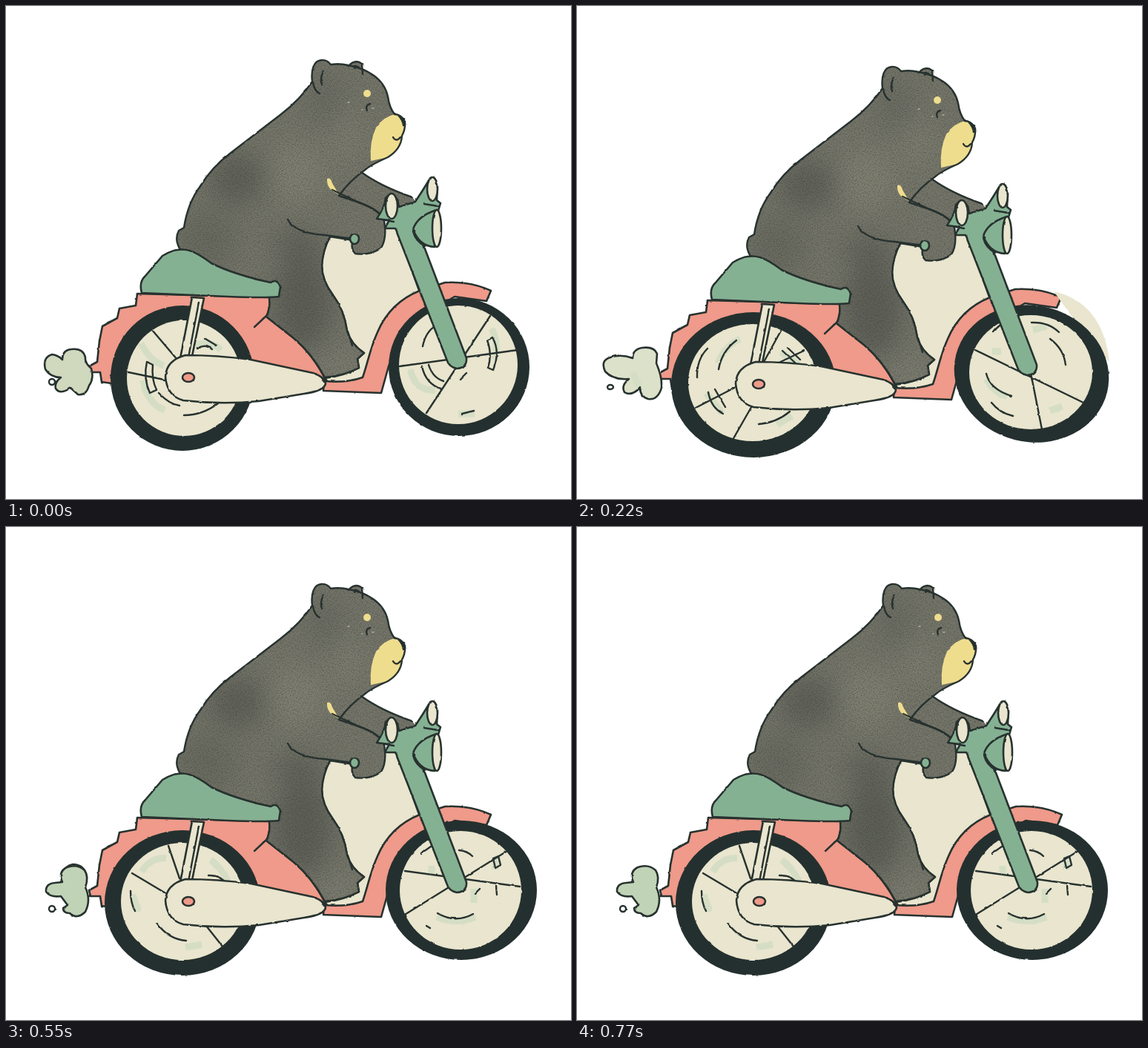
An HTML page that plays this animation: 762 by 665 pixels, repeating every 880 ms.

```html
<!DOCTYPE html>
<html lang="en">
<head>
<meta charset="utf-8">
<title>Bear on a scooter</title>
<style>
html, body { margin: 0; width: 100%; height: 100%; overflow: hidden; background: #fff; }
svg { display: block; width: 100vw; height: 100vh; }
.ride { animation: bounce 440ms step-end infinite; }
.high { animation: high 440ms step-end infinite; }
.mid { animation: mid 440ms step-end infinite; }
.low { animation: low 440ms step-end infinite; }
.rim { animation: rim 880ms step-end infinite; }
@keyframes bounce { 0% { transform: none; } 25%, 75% { transform: translate(0, 4px); } 50% { transform: translate(-1px, 9px); } }
@keyframes high { 0% { opacity: 1; } 25%, 100% { opacity: 0; } }
@keyframes mid { 0%, 50% { opacity: 0; } 25%, 75% { opacity: 1; } }
@keyframes low { 0%, 75%, 100% { opacity: 0; } 50% { opacity: 1; } }
@keyframes rim { 0% { opacity: 1; } 87.5%, 100% { opacity: 0; } }
path, ellipse, circle { stroke-linejoin: round; stroke-linecap: round; }
.ink { stroke: #27322f; stroke-width: 2.6; }
.line { fill: none; stroke: #27322f; stroke-width: 2.4; }
.coral { fill: #ef9a8a; }
.cream { fill: #e9e5ce; }
.green { fill: #85b193; }
.yellow { fill: #efdd8e; }
.black { fill: #24302f; }
.wash { fill: none; stroke: #d5dec5; stroke-width: 9; stroke-linecap: butt; }
.fur { fill: #77776b; }
</style>
</head>
<body>
<svg viewBox="0 0 762 665" preserveAspectRatio="none">
<defs>
  <filter id="rough" filterUnits="userSpaceOnUse" x="0" y="0" width="762" height="665" color-interpolation-filters="sRGB">
    <feTurbulence type="fractalNoise" baseFrequency=".09" numOctaves="3" seed="4"/>
    <feDisplacementMap in="SourceGraphic" scale="2" xChannelSelector="R" yChannelSelector="G"/>
  </filter>
  <filter id="grain" filterUnits="userSpaceOnUse" x="200" y="50" width="380" height="470" color-interpolation-filters="sRGB">
    <feTurbulence type="fractalNoise" baseFrequency=".6" numOctaves="2" seed="7"/>
    <feColorMatrix values="0 0 0 0 .16  0 0 0 0 .18  0 0 0 0 .17  .9 0 0 0 -.36"/>
    <feComposite in2="SourceGraphic" operator="in" result="specks"/>
    <feMerge><feMergeNode in="SourceGraphic"/><feMergeNode in="specks"/></feMerge>
  </filter>
  <filter id="soft" filterUnits="userSpaceOnUse" x="150" y="0" width="480" height="600" color-interpolation-filters="sRGB">
    <feGaussianBlur stdDeviation="16"/>
  </filter>
  <path id="bear" d="M413 102C411 86 415 74 425 73Q433 72 438 79Q450 77 462 80Q480 83 495 93Q511 104 515 122Q517 137 524 146Q533 146 538 156Q539 166 534 175Q533 193 515 204Q492 214 483 222Q463 236 449 256L476 265Q506 276 510 290Q514 313 506 326Q492 337 471 334Q464 327 468 316L437 311Q427 330 426 350Q426 370 441 390Q456 410 460 438Q465 456 483 468L474 476L476 488Q455 499 430 501Q414 470 388 448L351 419Q357 407 355 393L300 385L234 327Q227 314 233 303L240 299Q245 266 262 243Q278 217 302 199L371 146Q397 126 413 102Z"/>
  <clipPath id="inside"><use href="#bear"/></clipPath>
</defs>

<g class="ride" filter="url(#rough)">
  <path class="cream ink" d="M437 311Q427 330 426 350Q426 370 441 390Q456 410 460 438Q465 456 483 468L474 476L476 488Q455 499 430 502L434 507L482 507L510 440L558 386L527 300L505 296L490 311Z"/>
  <path class="coral ink" d="M177 388L175 404L153 408L150 421L130 432L126 452L123 480L112 486L114 494L127 494L129 507L142 509L340 500L432 506Q414 470 388 448L351 419Q357 407 355 393Z"/>
  <path class="line" d="M351 418L335 433"/>
  <path class="coral ink" d="M429 506Q458 509 481 501C488 481 491 462 501 440Q518 400 558 384L592 373Q626 371 654 384L648 398L605 392L575 410L530 450L516 486L506 522L428 519Z"/>
</g>

<g class="high" filter="url(#rough)">
  <path class="ink" fill="#d0d8bd" d="M53 490Q49 474 62 470Q70 471 76 477Q76 464 88 463Q104 461 107 474Q106 481 115 489Q119 503 112 512Q108 526 97 524L87 515Q73 525 67 516Q65 508 74 501Q60 501 53 490Z"/>
  <circle class="line" cx="62" cy="507" r="4"/>
  <ellipse class="black" cx="238" cy="502" rx="97" ry="98"/>
  <ellipse class="cream" cx="240" cy="502" rx="77" ry="78"/>
  <path class="wash" d="M182 455Q195 480 213 485M184 505Q191 536 214 545M251 459Q275 449 290 464"/>
  <path class="line" d="M197 437L231 477M165 494L218 505M190 480L198 484Q196 503 203 518L194 522Q185 502 190 480M206 522Q220 537 234 539M240 552Q265 552 286 536M258 462Q268 455 278 463M269 449L284 458"/>
  <ellipse class="black" cx="611" cy="487" rx="95" ry="93"/>
  <ellipse class="cream" cx="610" cy="484" rx="80" ry="80"/>
  <path class="wash" d="M545 490Q552 520 579 518M655 435Q665 455 659 477M610 550H632"/>
  <path class="line" d="M653 418L567 549M531 486L690 464M562 459Q566 439 580 431M561 486Q566 510 588 517M570 484Q575 501 590 506M656 447Q667 466 657 491L650 488Q656 470 649 451ZM615 550L631 546M613 503L621 495"/>
</g>

<g class="mid" filter="url(#rough)">
  <path class="ink rim" fill="#fff" d="M77 468Q79 457 90 455Q106 455 109 472Z"/>
  <path class="ink" fill="#c1d3b6" d="M54 492Q53 481 66 480L76 479Q70 465 82 459Q96 454 106 463Q112 472 107 486Q115 503 107 519Q96 530 86 521Q77 521 77 514L83 510L74 498Q60 500 54 492Z"/>
  <circle class="line" cx="62" cy="515" r="4"/>
  <ellipse class="black" cx="238" cy="507" rx="105" ry="98"/>
  <ellipse class="cream" cx="238" cy="505" rx="83" ry="79"/>
  <path class="wash" d="M183 465Q196 445 216 447M276 449Q291 460 299 478M171 496L178 519M242 567L264 563"/>
  <path class="line" d="M170 467L222 498M219 430L234 474M270 538L293 567M204 535Q219 556 243 558M168 491Q168 507 174 518M273 470Q289 469 298 482"/>
  <ellipse class="black" cx="614" cy="490" rx="102" ry="94"/>
  <ellipse class="cream" cx="613" cy="490" rx="82" ry="80"/>
  <path class="wash" d="M581 526Q606 537 633 526M631 488V507M660 445V462M574 457V469"/>
  <path class="line" d="M538 464L693 485M536 524L676 437M582 521Q606 535 630 522M560 440L573 431M611 436Q622 437 629 444M657 447L664 444L667 456L660 460ZM633 494L639 488M661 485L662 496M567 538L572 541"/>
</g>

<g class="low" filter="url(#rough)">
  <path class="ink" fill="#dce1ca" d="M38 493Q31 478 45 474Q59 469 75 475Q75 463 88 461Q104 459 108 469L107 482Q115 500 114 515Q109 532 96 530Q85 527 85 515Q73 527 64 521Q59 512 70 503Q49 505 38 493Z"/>
  <path class="wash" d="M75 494L84 514"/>
  <ellipse class="line" cx="45" cy="514" rx="4" ry="3"/>
  <ellipse class="black" cx="238" cy="511" rx="111" ry="98"/>
  <ellipse class="cream" cx="237" cy="508" rx="87" ry="79"/>
  <path class="wash" d="M190 482Q199 459 220 449M174 522L196 549M275 467L299 484M270 565L290 553"/>
  <path class="line" d="M160 542L218 512M210 585L238 536M252 480L275 438M262 486L306 465M191 490Q195 466 215 451M162 502Q161 477 176 462M177 521Q181 542 197 550M186 517L200 541M277 465L297 484M284 461L301 477M245 564Q269 562 287 547"/>
  <path class="cream" d="M643 385Q709 400 718 480L690 450Z"/>
  <ellipse class="black" cx="613" cy="496" rx="105" ry="92" transform="rotate(14 613 496)"/>
  <ellipse class="cream" cx="612" cy="494" rx="83" ry="77"/>
  <path class="wash" d="M560 466H572M615 437L633 432M552 503Q562 522 580 526M638 546L654 540"/>
  <path class="line" d="M537 464L683 535M611 490L627 571M638 449Q657 463 659 485M613 427Q636 426 650 440M552 496Q557 517 586 526M559 535Q570 549 588 553M562 439Q570 429 580 426"/>
</g>

<g class="ride">
  <g filter="url(#rough)">
    <path class="cream ink" d="M251 393L235 475L250 477L267 394Z"/>
    <path class="line" d="M260 400L246 474"/>
    <path class="cream ink" d="M242 471Q216 478 215 500Q217 526 239 532Q290 538 341 533L402 523Q430 519 431 509Q429 500 414 495L330 477Q285 471 242 471Z"/>
    <ellipse class="coral ink" cx="246" cy="501" rx="8" ry="6"/>
  </g>
  <g filter="url(#grain)">
    <path class="fur" d="M479 224Q505 243 548 258L556 268L530 282L500 290L445 258Z"/>
    <path class="fur" d="M461 82Q472 70 480 78L481 92Z"/>
    <use href="#bear" class="fur"/>
    <g clip-path="url(#inside)">
      <g filter="url(#soft)">
        <ellipse cx="312" cy="233" rx="38" ry="35" fill="#4c4f49" opacity=".5"/>
        <ellipse cx="400" cy="400" rx="40" ry="65" fill="#484c46" opacity=".5"/>
        <ellipse cx="430" cy="125" rx="22" ry="36" fill="#54564f" opacity=".3"/>
        <ellipse cx="395" cy="320" rx="36" ry="16" fill="#4c4f49" opacity=".5"/>
        <ellipse cx="270" cy="315" rx="40" ry="40" fill="#5a5c54" opacity=".4"/>
        <ellipse cx="392" cy="225" rx="38" ry="42" fill="#89897b" opacity=".6"/>
        <ellipse cx="460" cy="180" rx="25" ry="38" fill="#858578" opacity=".5"/>
        <ellipse cx="450" cy="486" rx="28" ry="18" fill="#858578" opacity=".7"/>
      </g>
    </g>
  </g>
  <g filter="url(#rough)">
    <path class="yellow" d="M492 209Q490 183 499 164Q509 149 525 146Q536 147 538 157Q538 169 533 178Q533 193 515 204Z"/>
    <circle class="yellow" cx="487" cy="118" r="5"/>
    <path class="yellow" d="M433 233Q438 231 440 239L449 254Q432 248 433 233Z"/>
    <use href="#bear" class="line"/>
    <path class="line" d="M462 81Q471 71 480 78L481 92M470 84Q474 80 476 83M428 88Q423 98 426 106M414 103Q416 115 423 118M479 224Q505 243 548 258M440 248L476 265Q506 276 510 290M468 314L430 309Q389 306 380 288M437 312L431 322M461 439L467 458"/>
    <path class="black" d="M528 148Q537 148 539 157Q539 163 535 162Q534 154 528 148Z"/>
    <path class="line" d="M522 177Q526 184 532 177M491 132Q484 134 487 141"/>
    <path class="green ink" d="M183 387Q179 372 188 364L211 337Q230 325 248 330Q260 334 277 347Q307 362 357 373Q366 367 370 379L368 392Q350 394 300 392Z"/>
    <ellipse class="green ink" cx="470" cy="314" rx="6" ry="7"/>
    <path class="green ink" d="M500 287Q511 271 512 259Q520 250 528 261L530 271L552 264Q562 249 571 234Q578 226 582 242L581 262L586 266L583 276L560 286L564 325L621 475Q622 488 608 489Q597 487 594 476L525 300L511 300L517 289Z"/>
    <path class="green ink" d="M549 301Q555 283 581 275L578 325Q557 324 549 301Z"/>
    <path class="line" d="M549 304Q552 317 565 324M564 267L583 270M512 289L523 291"/>
    <ellipse class="cream ink" cx="520" cy="270" rx="8" ry="17"/>
    <ellipse class="cream ink" cx="575" cy="247" rx="7" ry="16"/>
    <ellipse class="cream ink" cx="581" cy="300" rx="6" ry="25"/>
  </g>
  <path d="M461 130h2M480 140h1M494 138h2" stroke="#d8d8ce"/>
</g>
</svg>
</body>
</html>
```
